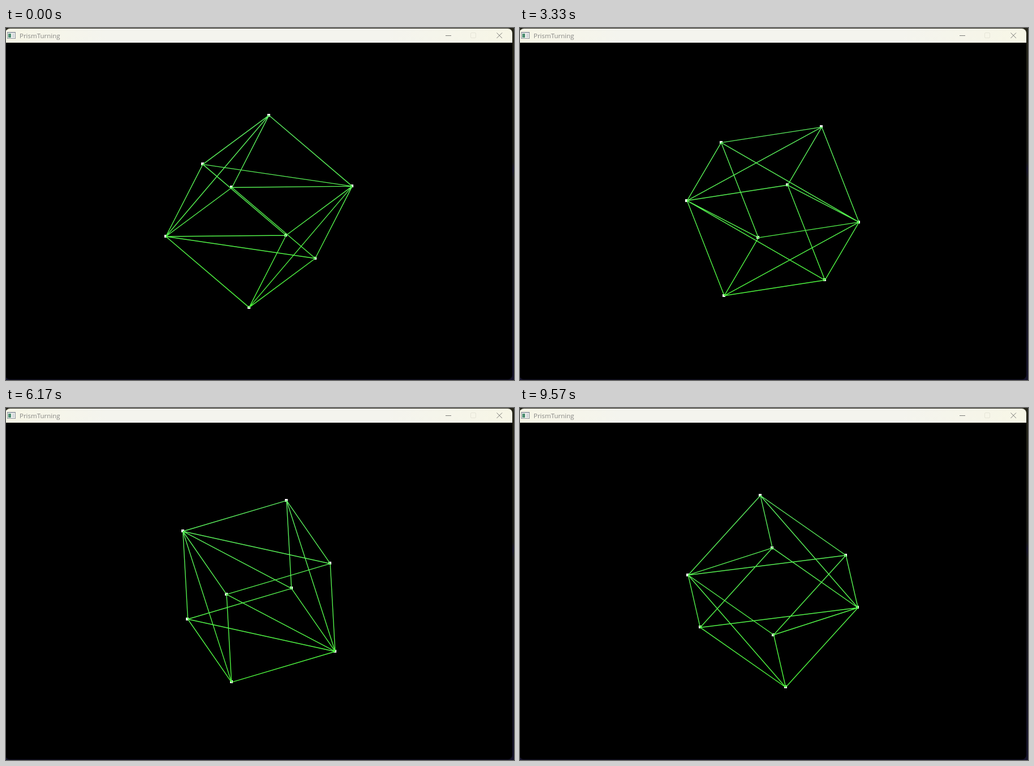
An HTML page with a canvas that plays this animation: 898 px wide and 623 px high, repeating every 9610 ms.

```html
<!DOCTYPE html>
<html lang="en">
<head>
<meta charset="utf-8">
<title>PrismTurning</title>
<style>
  html, body { margin: 0; width: 100%; height: 100%; overflow: hidden; }
  body { position: relative; background: linear-gradient(#26251a, #1a1a16 38%, #17152c 40%, #1a1a16 43%, #15132a); }
  .window {
    position: absolute; left: -1px; top: 1px; width: 896px; height: 621px;
    border-radius: 8px; overflow: hidden; background: #000;
  }
  .bar {
    position: absolute; inset: 0 0 auto; height: 25px;
    background: linear-gradient(90deg, #f7f6e6, #f4f4ee 20%, #f4f4ee 75%, #f7f6e6);
  }
  .title {
    position: absolute; left: 25px; top: 0; white-space: nowrap;
    font: 11.5px/25px "Open Sans", "Noto Sans", sans-serif; color: #868684;
  }
  svg, canvas { position: absolute; left: 0; top: 0; }
</style>
</head>
<body>
<div class="window">
  <div class="bar"></div>
  <div class="title">PrismTurning</div>
</div>
<canvas id="stage" width="898" height="623"></canvas>
<svg width="898" height="26" fill="none">
  <rect x="2.5" y="7.5" width="14" height="11" fill="#f6f6f2" stroke="#8b929a"/>
  <path d="M3 8.5h13" stroke="#b4bcc6"/>
  <rect x="4" y="10" width="5" height="7" fill="#4f8f72"/>
  <rect x="11" y="10" width="4" height="7" fill="#d5d9dc"/>
  <path d="M777 13.5h10" stroke="#7d7d7a"/>
  <rect x="821.5" y="8.5" width="9" height="9" rx="1.5" stroke="#e6e5d8"/>
  <path d="M867.5 8.5l9.5 9.5m0-9.5l-9.5 9.5" stroke="#7d7d7a"/>
</svg>
<script>
const LOOP = 9610, FRAME = 100 / 3, LAST_FRAME = 287;
const CENTER = [446.3, 323.6], SIDE = 199;
const RAD = Math.PI / 180;

// Time in ms and turn in degrees about a fixed, slightly tilted axis.
const TURN = [[0, -225], [1830, -170.3], [3330, -125.2], [4230, -97.5],
              [6170, -39.4], [7570, 3.2], [9570, 63.6]];
const AXIS = [5 / Math.sqrt(26), 1 / Math.sqrt(26)];

// Cube edges at zero turn: upright, yawed by 30 degrees.
const EDGES = [
  [SIDE * Math.sin(30 * RAD), 0, SIDE * Math.cos(30 * RAD)],
  [SIDE * Math.cos(30 * RAD), 0, -SIDE * Math.sin(30 * RAD)],
  [0, SIDE, 0]
];

// Corner indices are bit masks; all face diagonals meet at corners 0 and 7.
const LINES = [];
for (let a = 0; a < 8; a++) {
  for (let b = a + 1; b < 8; b++) {
    const diff = a ^ b;
    const isEdge = [1, 2, 4].includes(diff);
    const isDiagonal = [3, 5, 6].includes(diff) && (a === 0 || b === 7);
    if (isEdge || isDiagonal) LINES.push([a, b]);
  }
}

const ctx = document.getElementById("stage").getContext("2d");
const green = ctx.createLinearGradient(0, 150, 0, 500);
green.addColorStop(0, "#5cec62");
green.addColorStop(1, "#4cf83a");
ctx.strokeStyle = green;
ctx.fillStyle = "#fff";
ctx.lineWidth = 1.4;

function turnAt(time) {
  let i = 1;
  while (i < TURN.length - 1 && time > TURN[i][0]) i++;
  const [t0, a0] = TURN[i - 1], [t1, a1] = TURN[i];
  return (a0 + (a1 - a0) * (time - t0) / (t1 - t0)) * RAD;
}

// Rotation about AXIS, keeping only the screen coordinates.
function project([x, y, z], angle) {
  const [nx, ny] = AXIS, c = Math.cos(angle), s = Math.sin(angle);
  const along = (nx * x + ny * y) * (1 - c);
  return [x * c + ny * z * s + nx * along, y * c - nx * z * s + ny * along];
}

function draw(time) {
  const angle = turnAt(time);
  const edges = EDGES.map(edge => project(edge, angle));
  const corners = Array.from({ length: 8 }, (_, mask) => [0, 1].map(k =>
    edges.reduce((sum, edge, bit) => sum + edge[k] * ((mask >> bit & 1) - 0.5), CENTER[k])));

  ctx.clearRect(0, 0, 898, 623);
  for (const [x, y] of corners) ctx.fillRect(Math.round(x) - 2, Math.round(y) - 2, 5, 5);

  ctx.beginPath();
  for (const [a, b] of LINES) {
    ctx.moveTo(corners[a][0] + 1, corners[a][1] + 1);
    ctx.lineTo(corners[b][0] + 1, corners[b][1] + 1);
  }
  ctx.stroke();
}

const frameStart = n => Math.round(n * FRAME / 10) * 10;
const start = performance.now();

function tick() {
  const time = Math.max(0, performance.now() - start) % LOOP;
  let n = Math.min(LAST_FRAME, Math.floor((time + 4) / FRAME));
  if (frameStart(n) > time) n--;
  draw(frameStart(n));
  requestAnimationFrame(tick);
}
tick();
</script>
</body>
</html>
```
